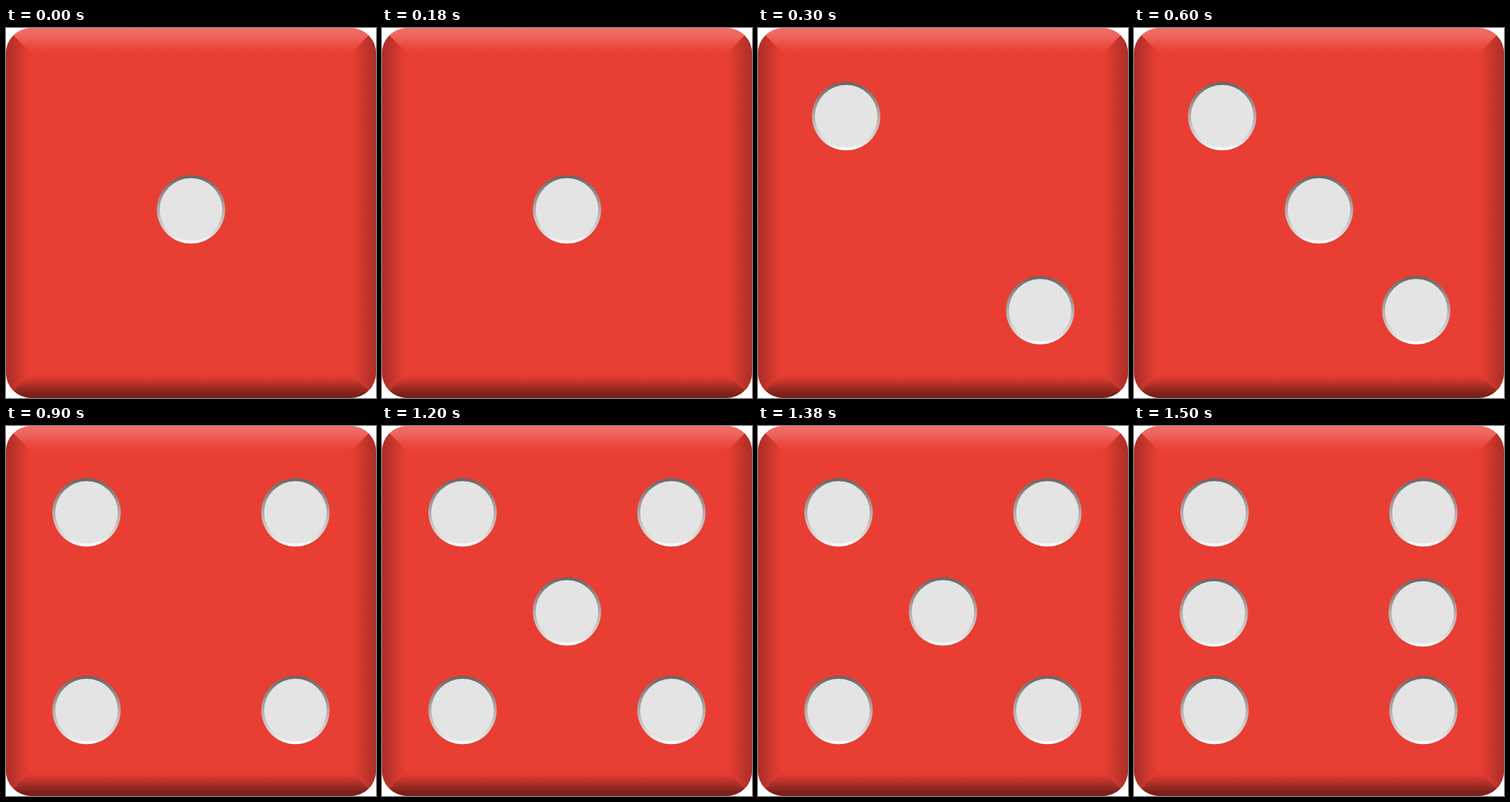
Recreate the animation shown at these times as an HTML page with a canvas. Size 512 by 512 pixels, loop 1800 ms.

```html
<!DOCTYPE html>
<html>
<head>
<meta charset="utf-8">
<style>
  html, body { margin: 0; width: 100%; height: 100%; overflow: hidden; background: #fff; }
  canvas { display: block; }
</style>
</head>
<body>
<canvas id="die" width="512" height="512"></canvas>
<script>
const ctx = document.getElementById('die').getContext('2d');
const SIZE = 512, BEVEL = 36, FACE_MS = 300;
const RED = '#e93e33';

const diagonal = [[122, 122], [390.5, 390.5]];
const middle = [256, 251];
const corners = [[111.5, 119.5], [400.5, 119.5], [111.5, 393], [400.5, 393]];
const faces = [
  [middle],
  diagonal,
  [...diagonal, middle],
  corners,
  [...corners, [256, 256.5]],
  [...corners, [110.5, 258], [399.5, 258]]
];

function gradient(x0, y0, x1, y1, stops) {
  const g = ctx.createLinearGradient(x0, y0, x1, y1);
  for (const [at, color] of stops) g.addColorStop(at, color);
  return g;
}

// Draws one mitred edge; it is shaded from the rim inwards, turned clockwise from the top.
function edge(turns, stops) {
  ctx.save();
  ctx.translate(SIZE / 2, SIZE / 2);
  ctx.rotate(turns * Math.PI / 2);
  ctx.translate(-SIZE / 2, -SIZE / 2);
  ctx.fillStyle = gradient(0, 0, 0, BEVEL, stops);
  ctx.beginPath();
  ctx.moveTo(0, 0);
  ctx.lineTo(SIZE, 0);
  ctx.lineTo(SIZE - BEVEL, BEVEL);
  ctx.lineTo(BEVEL, BEVEL);
  ctx.fill();
  ctx.restore();
}

function disc(x, y, r, fill) {
  ctx.fillStyle = fill;
  ctx.beginPath();
  ctx.arc(x, y, r, 0, Math.PI * 2);
  ctx.fill();
}

function pip([x, y]) {
  disc(x, y, 47.3, gradient(0, y - 47, 0, y + 47,
    [[0, '#686563'], [0.12, '#7c7674'], [0.5, '#b5aaa8'], [0.85, '#e0dcdb'], [1, '#fff']]));
  disc(x, y, 43.3, '#e4e4e4');
}

function body() {
  ctx.clearRect(0, 0, SIZE, SIZE);
  ctx.save();
  ctx.beginPath();
  ctx.roundRect(0, 0, SIZE, SIZE, 35);
  ctx.clip();
  ctx.fillStyle = RED;
  ctx.fillRect(0, 0, SIZE, SIZE);
  const side = [[0, '#ae2f27'], [0.25, '#b9322a'], [0.6, '#d3392f'], [0.85, '#e53d32'], [1, RED]];
  edge(0, [[0, '#ef706a'], [0.3, '#ee655d'], [0.7, '#eb4a40'], [1, RED]]);
  edge(1, side);
  edge(3, side);
  edge(2, [[0, '#76201a'], [0.22, '#7d231c'], [0.24, '#8f2720'], [0.38, '#9c2a23'],
    [0.6, '#c2342b'], [0.85, '#e33c32'], [1, RED]]);
  ctx.restore();
}

function draw() {
  body();
  faces[Math.floor(performance.now() / FACE_MS) % faces.length].forEach(pip);
  requestAnimationFrame(draw);
}
draw();
</script>
</body>
</html>
```
